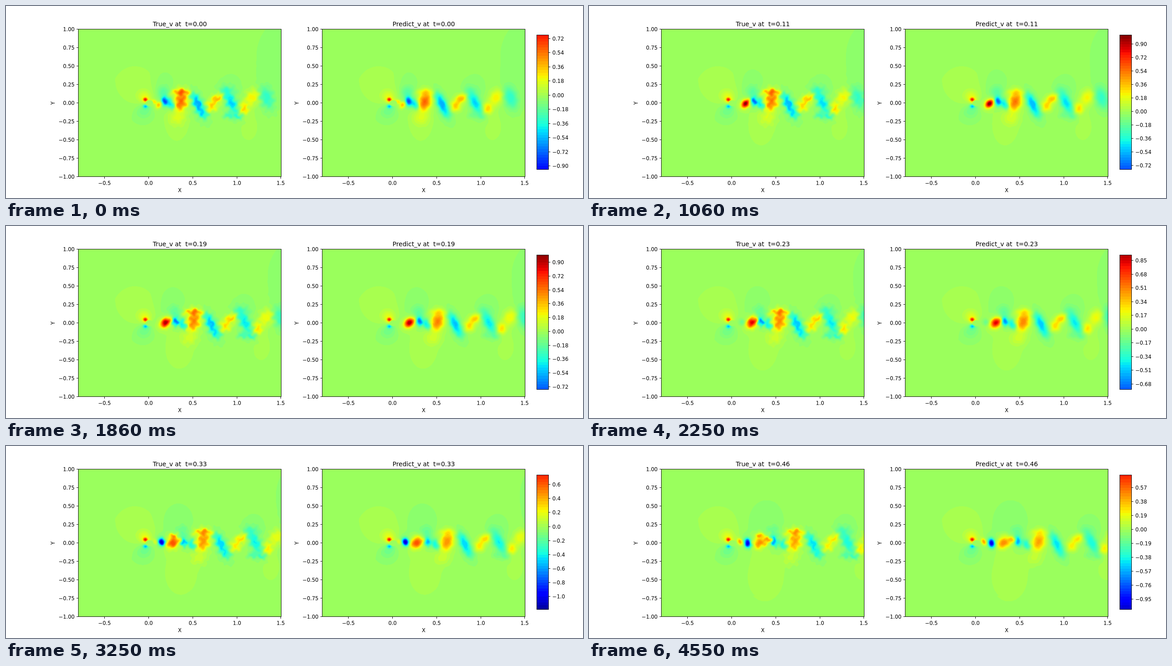
Animation, 1280 px wide and 427 px high, one loop 4.61 s. Source, as an HTML page with a canvas:

```html
<!DOCTYPE html>
<html lang="en">
<head>
<meta charset="utf-8">
<title>Wake velocity</title>
<style>
html, body { margin: 0; width: 100%; height: 100%; overflow: hidden; background: #fff; }
canvas { display: block; width: 1280px; height: 427px; }
</style>
</head>
<body>
<canvas id="stage" width="1280" height="427"></canvas>
<script>
const ctx = document.getElementById('stage').getContext('2d');
const LOOP = 4610, LAST = 46;
const KEYS = [0, 11, 19, 27, 33, 38, 46];
const W = 450, H = 328, LEFT = 161, TOP = 52, SHIFT = 541;
const UNIT_X = 195.65, UNIT_Y = 164, CX = 317.5, CY = 216;
const V_LOW = -1.225, V_HIGH = 1.02;
const MAXIMA = [.769, 1.02, .997, .845, .738, .746, .744];
const MINIMA = [-.943, -.77, -.752, -.738, -1.18, -1.235, -1.085];

// Vortices that drift downstream: x at the start, y, rx, ry, shear, amplitude.
const wake = [
  [352, 212, 7, 10, .1, -.72],
  [367, 219, 8, 11, .3, -.46],
  [388, 213, 14, 19, -.2, .6],
  [426, 218, 11, 25, .38, -.56],
  [469, 206, 11, 10, -.3, .4],
  [456, 223, 10, 11, 0, .34],
  [500, 216, 12, 23, .4, -.45],
  [527, 228, 10, 11, 0, .34],
  [547, 203, 14, 17, -.2, .27],
  [578, 204, 15, 24, .2, -.3],
  [350, 191, 14, 13, 0, -.14],
  [380, 250, 16, 14, 0, .11]
];

// Small features, much weaker in the predicted panel.
const ragged = [
  [388, 191, 18, 7, -.4, .46],
  [490, 188, 17, 9, 0, -.16],
  [493, 243, 9, 7, 0, -.22],
  [513, 246, 9, 6, .2, -.24],
  [438, 241, 12, 7, 0, -.18]
];

const clamp = v => Math.max(0, Math.min(1, v));
const lerp = (a, b, p) => a + (b - a) * p;

function key(values, n) {
  let i = 0;
  while (i < 5 && n > KEYS[i + 1]) i++;
  return lerp(values[i], values[i + 1], (n - KEYS[i]) / (KEYS[i + 1] - KEYS[i]));
}

function jet(v) {
  const x = clamp((v - V_LOW) / (V_HIGH - V_LOW));
  const r = x < .89 ? (x - .35) / .31 : 1 - (x - .89) / .22;
  const g = x < .5 ? (x - .125) / .25 : 1 - (x - .64) / .27;
  const b = x < .2 ? .5 + x / .22 : 1 - (x - .34) / .31;
  return [r, g, b].map(c => Math.round(255 * clamp(c)));
}

// Visits each pixel of a box, clipped to the panel.
function eachPixel(x, y, rx, ry, visit) {
  const x0 = Math.max(0, Math.floor(x - rx - LEFT)), x1 = Math.min(W, Math.ceil(x + rx - LEFT));
  const y0 = Math.max(0, Math.floor(y - ry - TOP)), y1 = Math.min(H, Math.ceil(y + ry - TOP));
  for (let j = y0; j < y1; j++)
    for (let i = x0; i < x1; i++) visit(j * W + i, i + LEFT + .5, j + TOP + .5);
}

const field = new Float32Array(W * H);
const warpX = new Float32Array(W * H);
const warpY = new Float32Array(W * H);

// Ripples carried along with the flow roughen the edges of the vortices.
function warp(n, rough) {
  eachPixel(386, CY, 230, 170, (p, x, y) => {
    const m = rough * clamp((x - 335) / 60), c = x - 1.55 * n;
    warpX[p] = x + m * (1.9 * Math.sin(.24 * c + .3 * y) + 1.2 * Math.sin(.41 * y - .17 * c + 1));
    warpY[p] = y + m * (1.8 * Math.sin(.31 * c - .2 * y) + 1.1 * Math.sin(.45 * c + .27 * y + 2));
  });
}

function addBlob(x, y, rx, ry, shear, a) {
  if (!a) return;
  eachPixel(x, y, 3.6 * (rx + Math.abs(shear) * ry), 3.6 * ry, p => {
    const dy = warpY[p] - y, dx = warpX[p] - x - shear * dy;
    const q = dx * dx / (rx * rx) + dy * dy / (ry * ry);
    field[p] += a * (.82 * Math.exp(-Math.pow(q, 1.2)) + .18 * Math.exp(-q / 2.6));
  });
}

// A region one barely visible band away from the background.
function addFaint(x, y, rx, ry, height) {
  eachPixel(x, y, 1.6 * rx, 1.6 * ry, (p, px, py) => {
    const q = ((px - x) / rx) ** 2 + ((py - y) / ry) ** 2;
    field[p] += height * Math.exp(-q * q);
  });
}

function addSurroundings(u, step) {
  const up = step * .95, down = -up;
  addFaint(378 + 12 * u, 262 + 28 * u, 28 + 19 * u, 44 + 18 * u, up);
  addFaint(350 + 40 * u, 172 - 6 * u, 25 + 22 * u, 34 + 20 * u, down);
  addFaint(538 + 68 * u, 268, 22, 34, up);
  addFaint(500 + 70 * u, 182, 26, 34, down);
  addFaint(640 + 60 * u, 110, 94, 100, down);
}

function addCylinderFlow(step) {
  eachPixel(286, 208, 125, 125, (p, x, y) => {
    const dx = x - CX, dy = y - CY - 2;
    const r2 = Math.max(90, dx * dx + dy * dy);
    const up = -.66 * dx - .75 * dy, down = -.6 * dx + .8 * dy;
    if (up > 0) field[p] += step * 48 * up / r2;
    if (down > 0) field[p] -= step * 21 * down / r2;
  });
  addBlob(309, 208, 4.5, 4, 0, .62);
  addBlob(309, 223, 5, 4, 0, -.42);
  addBlob(306, 200, 12, 11, 0, .1);
  addBlob(305, 234, 17, 16, 0, -.075);
}

// Vortices that form and shed just behind the cylinder.
function addShedding(n, u, predicted) {
  const peak = n < 11 ? .38 + .058 * n : .5 + .54 * Math.exp(-(((n - 11) / 20) ** 2));
  const grown = clamp(n / 33);
  addBlob(339 + 40 * u + 3 * Math.sin(Math.PI * u) * (u < .5 ? -.5 : 1), 220 - 5 * clamp(n / 19),
    6 + 7.5 * grown, 7 + 5 * grown, -.3, peak);
  const rise = clamp((n - 17) / 16);
  const late = clamp((n - 24) / 22);
  addBlob(328 + 24 * u, 216 - 4 * rise + 4 * late, 7, 6 + 3 * u, .1, -1.13 * rise * rise + .1 * late);
  addBlob(329 + 6 * late, 213, 5.5, 5 + 2 * u, .3, .28 * clamp(1 - n / 8) + .46 * late);
  addBlob(372 + 26 * u, 208, 7, 7, 0, (predicted ? .33 : .42) * late);
  addBlob(352 + 26 * u, 206 - 8 * u, 8, 5, 0, (predicted ? .06 : .42) * clamp((n - 15) / 20));
}

function addWake(n, u, predicted) {
  const fade = 1 - .24 * u;
  const add = ([x, y, rx, ry, shear, a], share) => {
    const speed = 1.27 + .27 * clamp((x - 355) / 40) + .08 * clamp((x - 440) / 20);
    addBlob(x + speed * n, y, rx, ry, shear, a * fade * share);
  };
  for (const blob of wake) add(blob, 1);
  for (const blob of ragged) add(blob, predicted ? .4 : 1);
}

function drawField(n, step, predicted) {
  const u = n / LAST;
  field.fill(-step / 2);
  warp(n, predicted ? .3 : 1);
  addCylinderFlow(step);
  addSurroundings(u, step);
  addShedding(n, u, predicted);
  addWake(n, u, predicted);
  eachPixel(CX, CY, 14, 12, (p, x, y) => {
    const q = ((x - CX - .5) / 9) ** 2 + ((y - CY) / 7) ** 2;
    field[p] = lerp(-step / 2, field[p], clamp((q - .6) * 2));
  });
  const bands = new Map();
  const image = ctx.createImageData(W, H);
  for (let p = 0; p < field.length; p++) {
    const k = Math.floor(field[p] / step);
    if (!bands.has(k)) bands.set(k, jet((k + .5) * step));
    image.data.set(bands.get(k), p * 4);
    image.data[p * 4 + 3] = 255;
  }
  ctx.putImageData(image, LEFT + (predicted ? SHIFT : 0), TOP);
}

function text(s, x, y, align = 'center', size = 11.6) {
  ctx.font = size + 'px "DejaVu Sans", sans-serif';
  ctx.textAlign = align;
  ctx.fillStyle = '#000';
  ctx.fillText(s, x, y + size * .364);
}

function line(x0, y0, x1, y1) {
  ctx.beginPath();
  ctx.moveTo(x0, y0);
  ctx.lineTo(x1, y1);
  ctx.stroke();
}

const label = (v, digits) => (v < -1e-9 ? '\u2212' : '') + Math.abs(v).toFixed(digits);

function drawAxes(offset, title) {
  const x0 = LEFT + offset;
  ctx.strokeRect(x0 - .5, TOP - .5, W, H);
  text(title, x0 + 224.7, 39.5, 'center', 13.9);
  for (let v = -.5; v <= 1.5; v += .5) {
    const x = Math.round(CX + offset + v * UNIT_X - .5) - .5;
    line(x, 380, x, 384);
    text(label(v, 1), x, 394);
  }
  for (let v = -1; v <= 1; v += .25) {
    const y = Math.round(CY - v * UNIT_Y) - .5;
    line(x0 - 4.5, y, x0 - .5, y);
    text(label(v, 2), x0 - 8.8, y + .3, 'right');
  }
  text('X', x0 + 224.5, 410);
  ctx.save();
  ctx.translate(x0 - 57.5, CY);
  ctx.rotate(-Math.PI / 2);
  text('Y', 0, 0);
  ctx.restore();
}

function drawColorbar(low, high, step) {
  const top = 64.5, bottom = 363.5;
  const yOf = v => lerp(bottom, top, clamp((v - low) / (high - low)));
  for (let k = Math.floor(low / step); k * step < high; k++) {
    const y = Math.round(yOf((k + 1) * step));
    ctx.fillStyle = `rgb(${jet((k + .5) * step)})`;
    ctx.fillRect(1178, y, 26, Math.round(yOf(k * step)) - y);
  }
  ctx.strokeRect(1177.5, top, 26, bottom - top);
  const tick = step * 5;
  const digits = Math.abs(tick * 10 - Math.round(tick * 10)) < 1e-6 ? 1 : 2;
  for (let k = Math.ceil(low / tick); k * tick <= high; k++) {
    const y = Math.round(yOf(k * tick)) - .5;
    line(1203.5, y, 1207.5, y);
    text(label(k * tick, digits), 1212, y + .5, 'left');
  }
}

function draw(n) {
  const low = key(MINIMA, n), high = key(MAXIMA, n);
  const step = Math.ceil((high - low) / 50 / .002 - 1e-6) * .002;
  const time = '_v at\u00a0\u00a0t=' + (n / 100).toFixed(2);
  ctx.fillStyle = '#fff';
  ctx.fillRect(0, 0, 1280, 427);
  ctx.strokeStyle = '#000';
  ctx.lineWidth = .95;
  drawField(n, step, false);
  drawField(n, step, true);
  drawAxes(0, 'True' + time);
  drawAxes(SHIFT, 'Predict' + time);
  drawColorbar(low, high, step);
}

function startOf(n) {
  if (n === 0) return 0;
  const late = n === 11 || (n > 12 && n % 6 === 1);
  return 100 * n - 50 + (late ? 10 : 0);
}

let shown = -1;
function tick() {
  const ms = performance.now() % LOOP;
  let n = LAST;
  while (startOf(n) > ms) n--;
  if (n !== shown) draw(shown = n);
  requestAnimationFrame(tick);
}
tick();
</script>
</body>
</html>
```
